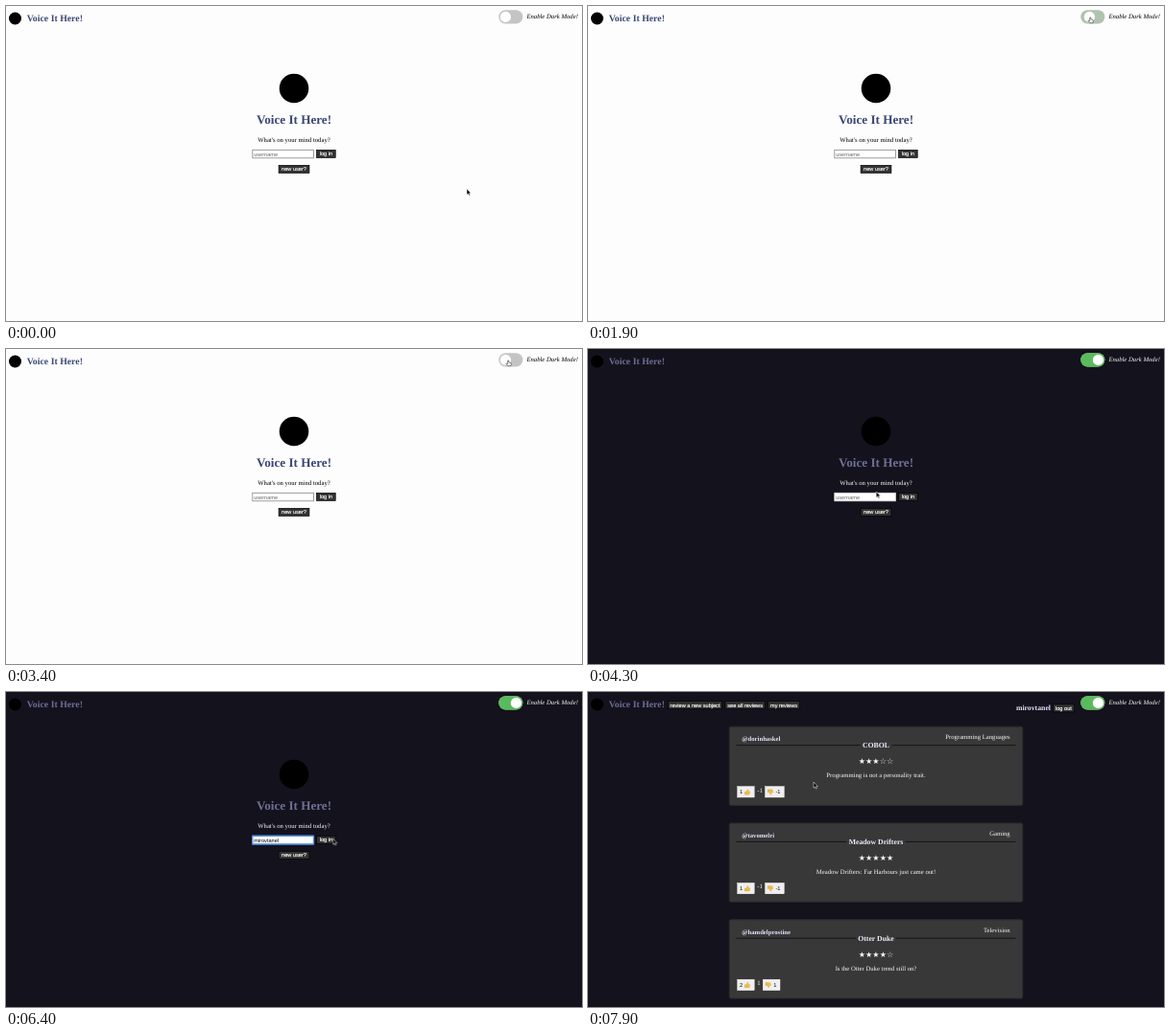
These frames come from a looping animation (600x329 px, 8000 ms). An HTML page:

```html
<!DOCTYPE html>
<html lang="en">
<head>
<meta charset="utf-8">
<title>Voice It Here!</title>
<style>
  @property --on { syntax: "<number>"; inherits: true; initial-value: 0; }

  html, body { margin: 0; width: 100%; height: 100%; overflow: hidden; }
  svg { display: block; width: 100vw; height: 100vh; }

  /* Slight lead so that every step has landed on its 100 ms beat. */
  .anim { animation: 8s step-end -30ms infinite; }

  #stage { animation-name: theme; background: var(--bg); font: 6.7px "Liberation Serif", "Times New Roman", serif; }
  text { fill: var(--ink); white-space: pre; text-rendering: geometricPrecision; }
  .mid { text-anchor: middle; }
  .end { text-anchor: end; }
  .bold { font-weight: bold; }
  .brand { font-weight: bold; fill: var(--brand); }
  .ui { font-family: "Liberation Sans", Arial, sans-serif; font-size: 5.6px; }
  .button rect { fill: #333; stroke: #000; stroke-width: .7; }
  .button text { fill: #fff; stroke: #fff; stroke-width: .15px; }
  .user { fill: #e6e1fb; font-weight: bold; }

  #track { animation-name: toggle; }
  #green { opacity: var(--on); }
  #knob { transform: translateX(calc(var(--on) * 11px)); }

  #login { animation-name: login; }
  #home { animation-name: home; }
  #hint { animation-name: hint; }
  #ring { animation-name: ring; }
  #typed tspan { animation: typed 8s step-end calc(var(--i) * 100ms - 30ms) infinite backwards; }
  #pointer { animation-name: move; }
  #arrow { animation-name: arrow; }
  #hand { animation-name: hand; }

  .card { fill: #383838; stroke: #2b2b2d; }
  .line { stroke: #121214; stroke-width: .9; }
  .topic { font-size: 7.78px; font-weight: bold; fill: #eeeaff; paint-order: stroke; stroke: #383838; stroke-width: 5px; }
  .stars { font: 8.1px "DejaVu Sans", sans-serif; }
  .vote rect { fill: #efefef; stroke: #fff; stroke-width: .4; }
  .vote text { fill: #000; }
  .thumb { fill: #f3bd3c; stroke: #b9822a; stroke-width: .2; }

  @keyframes theme {
    0%, 21.25%, 37.5% { --bg: #fdfdfd; --ink: #000; --brand: #3a4674; --edge: #858585; }
    13.75%, 28.75%, 46.25%, 100% { --bg: #14121c; --ink: #f7f7fa; --brand: #6d6f96; --edge: #d5dcde; }
  }
  @keyframes toggle {
    0%, 26.25%, 42.5% { --on: 0; }
    13.75% { --on: 0; }
    15% { --on: .45; }
    16.25% { --on: .82; }
    17.5% { --on: .97; }
    18.75%, 21.25% { --on: 1; }
    22.5%, 38.75% { --on: .55; }
    23.75%, 40% { --on: .18; }
    25%, 41.25% { --on: .03; }
    28.75%, 46.25% { --on: 0; }
    30%, 47.5% { --on: .45; }
    31.25%, 48.75% { --on: .82; }
    32.5%, 50% { --on: .97; }
    33.75%, 37.5%, 51.25%, 100% { --on: 1; }
  }
  @keyframes login { 0% { opacity: 1; } 85%, 100% { opacity: 0; } }
  @keyframes home { 0% { opacity: 0; } 85%, 100% { opacity: 1; } }
  @keyframes hint { 0% { opacity: 1; } 62.5%, 100% { opacity: 0; } }
  @keyframes ring { 0% { opacity: 0; } 57.5%, 100% { opacity: 1; } }
  @keyframes typed { 0%, 85%, 100% { visibility: hidden; } 62.5% { visibility: visible; } }
  @keyframes move {
    0% { transform: translate(480px, 191px); animation-timing-function: steps(4); }
    5% { transform: translate(497px, 90px); animation-timing-function: steps(3); }
    8.75% { transform: translate(512px, 1px); animation-timing-function: steps(3); }
    12.5% { transform: translate(517px, 8px); animation-timing-function: steps(7); }
    21.25% { transform: translate(523px, 11px); }
    47.5% { transform: translate(523px, 11px); animation-timing-function: steps(5); }
    53.75% { transform: translate(300.3px, 149px); animation-timing-function: steps(2); }
    56.25% { transform: translate(298px, 151px); }
    73.75% { transform: translate(305px, 166px); animation-timing-function: steps(5); }
    80% { transform: translate(340.5px, 153px); }
    85% { transform: translate(340.5px, 153px); animation-timing-function: steps(8); }
    95%, 100% { transform: translate(235px, 94px); }
  }
  @keyframes arrow { 0%, 47.5%, 73.75%, 100% { opacity: 1; } 12.5%, 57.5% { opacity: 0; } }
  @keyframes hand { 0%, 47.5%, 100% { opacity: 0; } 12.5% { opacity: 1; } }
</style>
</head>
<body>
<svg id="stage" class="anim" viewBox="0 0 600 329" preserveAspectRatio="none">
  <defs>
    <path id="thumb" class="thumb" d="M0 2.6h1.3v3H0zM1.6 2.6 2.8.3q1-.5 1 .7L3.5 2.2h1.6q.7.1.5.8L5.1 5q-.2.6-.8.6H1.6z"/>
  </defs>

  <circle cx="9.5" cy="13" r="6.5"/>
  <text class="brand" x="21.7" y="16" font-size="9.8">Voice It Here!</text>
  <g id="track" class="anim">
    <rect x="513.3" y="4.2" width="25" height="14.3" rx="7.15" fill="#c4c4c4"/>
    <rect id="green" x="513.3" y="4.2" width="25" height="14.3" rx="7.15" fill="#59bb5b"/>
    <circle id="knob" cx="520.4" cy="11.4" r="5.6" fill="#fff"/>
  </g>
  <text x="542.4" y="13.3" font-style="italic">Enable Dark Mode!</text>

  <g id="login" class="anim">
    <circle cx="300" cy="86" r="15.3"/>
    <text class="brand mid" x="300" y="123.3" font-size="13.15">Voice It Here!</text>
    <text class="mid" x="300" y="142">What's on your mind today?</text>
    <rect x="256.8" y="150.3" width="63.6" height="8.5" fill="#fff" style="stroke:var(--edge)" stroke-width=".8"/>
    <rect id="ring" class="anim" x="256.7" y="150.2" width="63.8" height="8.8" rx=".6" fill="none" stroke="#4f8ee8" stroke-width="1.4"/>
    <text id="hint" class="ui anim" x="258.2" y="156.5" style="fill:#696969">username</text>
    <text id="typed" class="ui" x="258.2" y="156.5" style="fill:#000"></text>
    <g id="loginButtons"></g>
  </g>

  <g id="home" class="anim">
    <text class="user end" x="482" y="19.2" font-size="7.78">mirovtanel</text>
  </g>

  <g id="pointer" class="anim">
    <path id="arrow" class="anim" d="M0 0V6.2L1.4 5 2.3 7.1 3.4 6.6 2.5 4.6H4.3z" stroke="#fff" stroke-width=".5"/>
    <path id="hand" class="anim" d="M-.3 1Q.3.4.8 1.1V2.9L3 3.5Q3.5 3.8 3.3 4.6L2.8 6.7H-.2L-2 4.7Q-2.2 3.8-1.2 4.1L-.3 4.6z" fill="#fff" stroke="#222" stroke-width=".55"/>
  </g>
</svg>
<script>
  const byId = id => document.getElementById(id);
  const add = (id, markup) => byId(id).insertAdjacentHTML('beforeend', markup);

  const button = (label, x, y, width) => `<g class="button">
    <rect x="${x}" y="${y}" width="${width}" height="8"/>
    <text class="ui mid" x="${x + width / 2}" y="${y + 6}">${label}</text></g>`;

  const vote = (x, width, content) => `<g class="vote" transform="translate(${x} 98.6)">
    <rect width="${width}" height="11.4"/>${content}</g>`;

  const card = ({ user, kind, topic, stars, text, up, score, down }, i) => {
    const downX = 182.2 + (score < 0 ? 2.3 : 0);
    return `<g transform="translate(0 ${i * 100.8})">
      <rect class="card" x="147.2" y="36.2" width="305.6" height="82.2" rx="1.5"/>
      <path class="line" d="M154.5 55.6H445.5"/>
      <text class="user" x="160.3" y="51">@${user}</text>
      <text class="end" x="439.7" y="49">${kind}</text>
      <text class="topic mid" x="300" y="58">${topic}</text>
      <text class="stars mid" x="300" y="75.3">${'★'.repeat(stars)}${'☆'.repeat(5 - stars)}</text>
      <text class="mid" x="300" y="89">${text}</text>
      ${vote(155.6, 17.6, `<text class="ui" x="2.5" y="7.8">${up}</text><use href="#thumb" x="7.6" y="3"/>`)}
      <text x="176.2" y="104.6">${score}</text>
      ${vote(downX, score < 0 ? 19.8 : 17.8, `<use href="#thumb" transform="translate(2.7 8.8) scale(1 -1)"/>
        <text class="ui" x="11" y="7.8">${down}</text>`)}
    </g>`;
  };

  const reviews = [
    { user: 'dorinhaskel', kind: 'Programming Languages', topic: 'COBOL', stars: 3,
      text: 'Programming is not a personality trait.', up: 1, score: -1, down: -1 },
    { user: 'tavomelri', kind: 'Gaming', topic: 'Meadow Drifters', stars: 5,
      text: 'Meadow Drifters: Far Harbours just came out!', up: 1, score: -1, down: -1 },
    { user: 'hamdelprostine', kind: 'Television', topic: 'Otter Duke', stars: 4,
      text: 'Is the Otter Duke trend still on?', up: 2, score: 1, down: 1 }
  ];

  // The last two letters come after a short pause.
  add('typed', [...'mirovtanel'].map((letter, i) =>
    `<tspan style="--i:${i < 8 ? i : i + 1}">${letter}</tspan>`).join(''));
  add('loginButtons', button('log in', 323.6, 150.4, 19.6) + button('new user?', 284.1, 166.4, 31.8));
  add('home', button('review a new subject', 83.3, 9.8, 56.4) + button('see all reviews', 143, 9.8, 41.2) +
    button('my reviews', 187.7, 9.8, 32.6) + button('log out', 484.5, 12.9, 21.8) +
    reviews.map(card).join(''));
</script>
</body>
</html>
```
